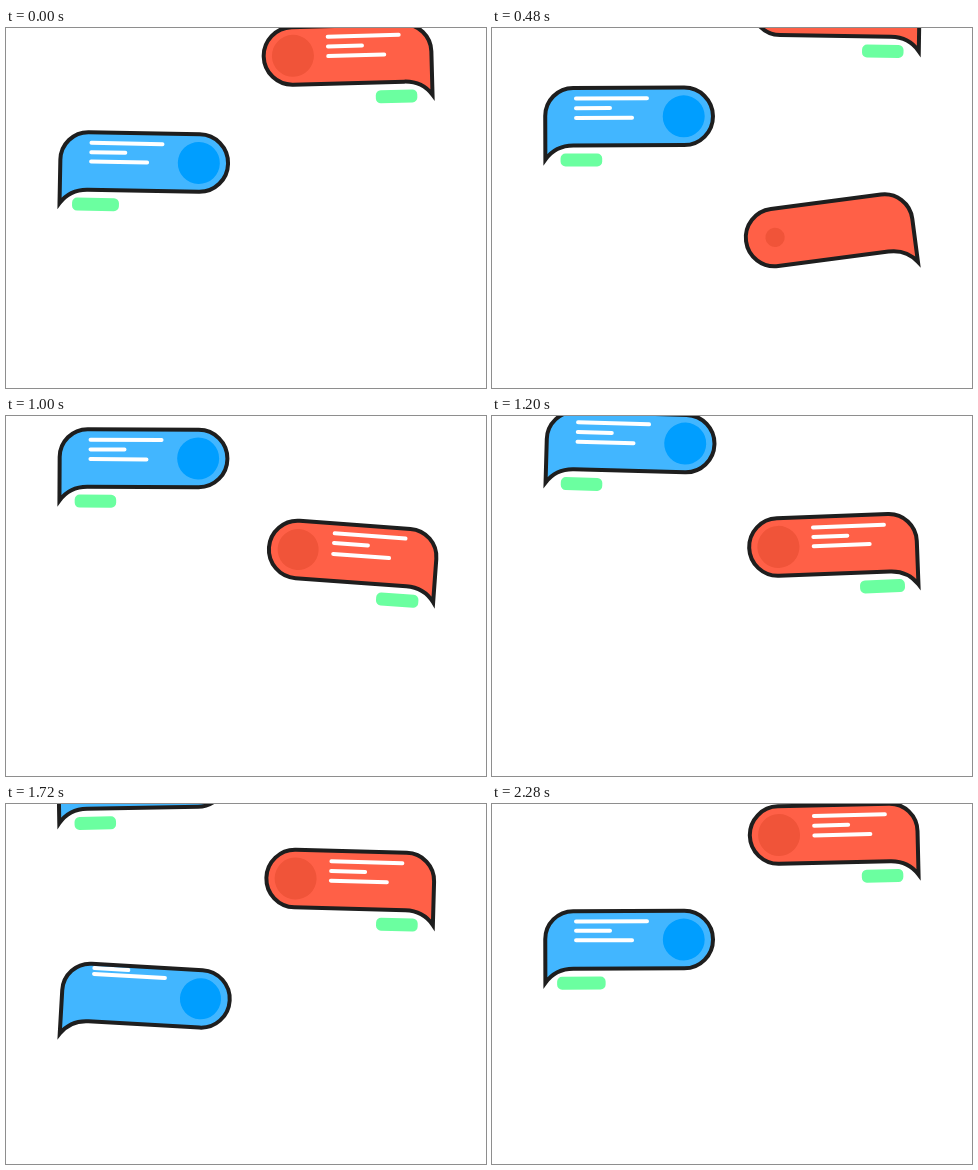
Animation of 480 by 360 pixels, one loop 2320 ms. Source, as an HTML page with a canvas:

```html
<!DOCTYPE html>
<html lang="en">
<head>
<meta charset="utf-8">
<title>Chat bubbles</title>
<style>
  html, body { margin: 0; width: 100%; height: 100%; overflow: hidden; background: #fff; }
  canvas { display: block; width: 480px; height: 360px; }
</style>
</head>
<body>
<canvas id="stage" width="480" height="360"></canvas>
<script>
const ctx = document.getElementById('stage').getContext('2d');
const LOOP = 2320, STEP = 40, SPEED = 0.0906;

const SIDES = [
  { dir: 1, x: 51.4, y: 286.2, born: 1160, body: '#42b6ff', dot: '#009eff' },
  { dir: -1, x: 428.7, y: 283, born: 0, body: '#ff6047', dot: '#f05439' }
];

// Ages in ms at which each part of a bubble starts to move.
const BODY_AT = 115, DOT_AT = 420, LINES_AT = 420, LINE_GAP = 90, PILL_AT = 850;

// Damped swing in radians, starting from rest position.
const swing = t => 0.241 * Math.exp(-0.00095 * t) * Math.sin(Math.PI * t / 505);

// Damped spring from 0 to 1.
const spring = t => t <= 0 ? 0 : 1 - Math.exp(-0.0065 * t) * Math.cos(Math.PI * t / 290);

const grow = t => 1 - (1 - Math.min(1, t / 125)) ** 3;

// The origin is the tip of the tail; the body extends to the right and up.
function outline() {
  ctx.beginPath();
  ctx.moveTo(2, -6);
  ctx.lineTo(2, -49.5);
  ctx.arcTo(2, -77.5, 30, -77.5, 28);
  ctx.arc(141, -48.75, 28.75, -Math.PI / 2, Math.PI / 2);
  ctx.lineTo(30, -20);
  ctx.quadraticCurveTo(12, -20, 2, -6);
  ctx.closePath();
}

function contents(side, age) {
  ctx.fillStyle = side.dot;
  ctx.beginPath();
  ctx.arc(140.5, -48.8, 21 * spring(age - DOT_AT), 0, Math.PI * 2);
  ctx.fill();

  // Text lines run left to right on both sides and drop in from the top edge.
  ctx.strokeStyle = '#fff';
  ctx.lineCap = 'round';
  const left = side.dir > 0 ? 32.8 : 105.2;
  [71, 34, 56].forEach((len, i) => {
    const s = spring(age - LINES_AT - LINE_GAP * i);
    if (!s) return;
    const y = -67 + i * 9.7 - 26 * (1 - s);
    ctx.beginPath();
    ctx.moveTo(left, y);
    ctx.lineTo(left + len * side.dir, y);
    ctx.stroke();
  });
}

function pill(s) {
  const w = 41.5 * s, h = 13 * Math.min(1, s);
  ctx.fillStyle = '#6bffa0';
  ctx.beginPath();
  ctx.roundRect(38 - w / 2, -5.5 - h / 2, w, h, Math.min(5, h / 2));
  ctx.fill();
}

function bubble(side, age) {
  const t = age - BODY_AT;
  if (t <= 0) return;
  const size = grow(t);
  ctx.save();
  ctx.translate(side.x, side.y - SPEED * age);
  ctx.scale(side.dir * size, size);
  ctx.rotate(swing(t));
  ctx.lineWidth = 4;

  ctx.save();
  outline();
  ctx.fillStyle = side.body;
  ctx.fill();
  ctx.clip();
  contents(side, age);
  ctx.restore();

  outline();
  ctx.strokeStyle = '#1e1e1e';
  ctx.stroke();
  pill(spring(age - PILL_AT));
  ctx.restore();
}

function draw() {
  const t = Math.floor(performance.now() % LOOP / STEP) * STEP;
  ctx.fillStyle = '#fff';
  ctx.fillRect(0, 0, 480, 360);
  for (const side of SIDES) {
    for (let age = t - side.born; age < 3700; age += LOOP) bubble(side, age);
  }
  requestAnimationFrame(draw);
}
draw();
</script>
</body>
</html>
```
